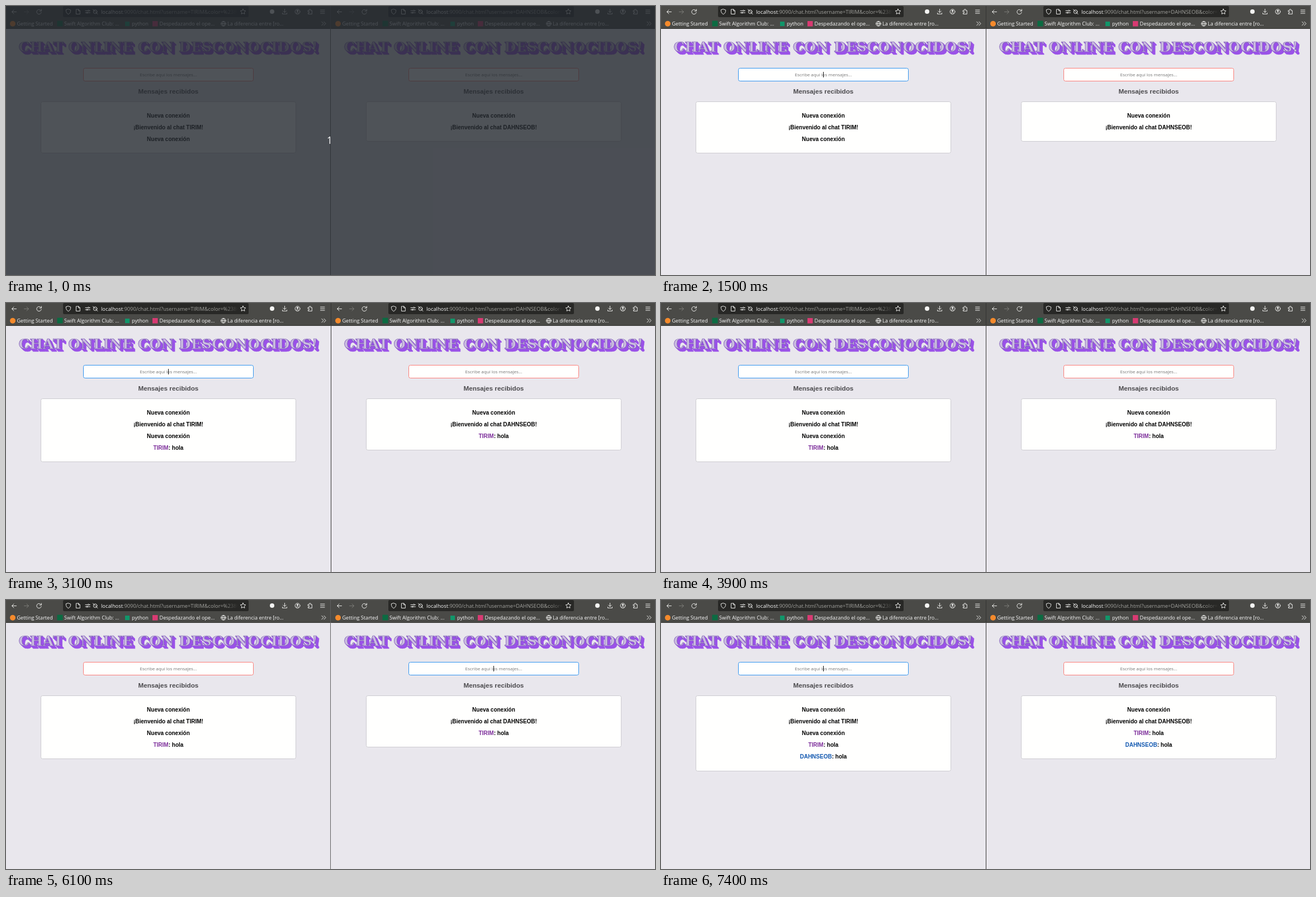
Write an HTML page that moves like this. It is 1161 px wide and 482 px high and loops after 8000 ms.

```html
<!DOCTYPE html>
<html lang="es">
<head>
<meta charset="utf-8">
<title>Chat</title>
<style>
  html, body { margin: 0; width: 100%; height: 100%; overflow: hidden; background: #e9e7ed; }
  svg { display: block; }
  text { white-space: pre; }
  .ui { font-family: "Open Sans", "Noto Sans", sans-serif; font-size: 9.1px; fill: #fafafa; }
  .url { font-size: 9.3px; }
  .field { font-size: 8px; text-anchor: middle; }
  .msg { font: bold 10px "Liberation Sans", Arial, sans-serif; text-anchor: middle; }
  .sub { font-size: 11.7px; fill: #4b4a4d; }
  .title { font: bold 25px "DejaVu Serif", serif; text-anchor: middle; stroke-width: .7px; }
  .icons { fill: none; stroke: #f4f4f2; stroke-width: .95; stroke-linecap: round; stroke-linejoin: round; }
</style>
</head>
<body>
<svg id="stage" width="1161" height="482" viewBox="0 0 1161 482"></svg>
<script>
const LOOP = 8000, MID = 290.4, RIGHT = 582;
const LEFT_NAME = "TIRIM", RIGHT_NAME = "DAHNSEOB";
const stage = document.getElementById("stage");
const pen = document.createElement("canvas").getContext("2d");

const between = (t, a, b) => t >= a && t < b;
// Last value whose start time has passed.
const at = (t, steps) => steps.reduce((v, [start, next]) => t >= start ? next : v, "");

const text = (x, y, cls, s, extra = "") => `<text x="${x}" y="${y}" class="${cls}" ${extra}>${s}</text>`;
const rect = (x, y, w, h, fill, extra = "") =>
  `<rect x="${x}" y="${y}" width="${w}" height="${h}" fill="${fill}" ${extra}/>`;
const circle = (x, y, r, extra = "") => `<circle cx="${x}" cy="${y}" r="${r}" ${extra}/>`;
const path = (d, extra = "") => `<path d="${d}" ${extra}/>`;

function star(cx, cy, r) {
  const points = Array.from({ length: 10 }, (_, i) => {
    const a = i * Math.PI / 5 - Math.PI / 2, q = i % 2 ? r * .5 : r;
    return `${(cx + q * Math.cos(a)).toFixed(2)},${(cy + q * Math.sin(a)).toFixed(2)}`;
  });
  return path(`M${points.join("L")}Z`);
}

const icons = `<g class="icons">
  ${path("M18.5 10.5H10.5M14 7L10.5 10.5L14 14")}
  ${path("M32.5 10.5H40.5M37 7L40.5 10.5L37 14", 'stroke="#7d7d79"')}
  ${path("M62.6 8.2A4.2 4.2 0 1 0 63.2 11.5M63.4 6V9H60.2")}
  ${path("M111.5 5.7L115.7 7.2Q116 12.6 111.5 14.8Q107 12.6 107.3 7.2Z")}
  ${path("M125.8 6H129.8L132.3 8.5V14.5H125.8ZM129.6 6V8.7H132.2")}
  ${path("M142 8.4H146M149 8.4H150.5M142 12H143.5M146.5 12H150.5")}
  ${circle(147.6, 8.4, 1.1)}${circle(145, 12, 1.1)}
  ${circle(159.6, 10.3, 3.3)}${path("M155.5 6L164 14.6")}
  ${star(424, 10.3, 5)}
  ${circle(476, 10, 4, 'fill="#f4f4f2" stroke="none"')}
  ${path("M498.5 5.5V11.5M495.7 9L498.5 11.8L501.3 9M494.5 12.5V14.3H502.5V12.5")}
  ${circle(521.5, 10.2, 4.4)}${circle(521.5, 8.8, 1.3, 'fill="#f4f4f2"')}${path("M519.2 12.6Q521.5 10.8 523.8 12.6")}
  ${path("M540.5 8H542.6Q541.8 5.7 543.8 5.7T545 8H547.3V14.4H540.5V12.3Q542.9 12.7 542.9 11.2T540.5 10.1Z")}
  ${path("M562.5 7.2H570M562.5 10.2H570M562.5 13.2H570")}
  ${path("M564.8 28.2L568 31.5L564.8 34.8M568.8 28.2L572 31.5L568.8 34.8")}
  ${circle(389, 31.7, 4.3)}${path("M384.8 31.7H393.2M389 27.4Q385 31.7 389 36Q393 31.7 389 27.4")}
</g>`;

const bookmarks = [
  [19.5, "Getting Started"], [104, "Swift Algorithm Club: …"], [225, "python"],
  [274.5, "Despedazando el ope…"], [396, "La diferencia entre [ro…"]
].map(([x, s]) => text(x, 34.9, "ui", s)).join("")
  + circle(12, 31.7, 5, 'fill="#f58a2c"')
  + rect(91.5, 26.5, 10, 10, "#0b6b42")
  + rect(213, 28, 8, 8, "#11966a")
  + rect(262, 27, 9.5, 9.5, "#d83a72");

const HEADING = "CHAT ONLINE CON DESCONOCIDOS!";
const titleLayer = (d, fill, stroke) =>
  text(MID + d, 81.6 + d, "title", HEADING, `fill="${fill}" stroke="${stroke}"`);
const title = [5, 4, 3, 2, 1].map(d => titleLayer(d, "#9b53e8", "#9b53e8")).join("")
  + titleLayer(0, "#cabcdf", "#7550b3");

function chrome(name, hover) {
  return rect(0, 0, 581, 41, "#4a4a47") + rect(0, 40, 581, 1, "#30302e")
    + rect(102, 0, 332, 20, "#282826", 'rx="2.5"')
    + (hover ? rect(88, 24, 119, 15, "#fff", `rx="2" fill-opacity="${hover}"`) : "")
    + `<g mask="url(#fade)">${text(170, 13.6, "ui url",
        `localhost<tspan fill="#a3a39f">:9090/chat.html?username=${name}&amp;color=%23863</tspan>`)}</g>`
    + bookmarks + icons;
}

function field({ draft, focus, caret }) {
  pen.font = '8px "Open Sans", "Noto Sans", sans-serif';
  const caretX = draft ? MID + pen.measureText(draft).width / 2 : 290;
  return rect(138.5, 111.5, 304, 23, "#fffffe", `rx="3" stroke="${focus ? "#2f93ee" : "#fb7c77"}"`)
    + text(MID, 126, "ui field", draft || "Escribe aquí los mensajes...",
        `style="fill:${draft ? "#111" : "#757575"}"`)
    + (caret ? rect(caretX, 118, 1, 10, "#111") : "");
}

function panel(x, view) {
  const lines = view.lines.map((s, i) => text(MID, 199.6 + i * 21.2, "msg", s)).join("");
  const height = 71 + (view.lines.length - 2) * 21.2;
  return `<g transform="translate(${x})">` + chrome(view.name, view.hover) + title + field(view)
    + text(MID, 156.7, "msg sub", "Mensajes recibidos")
    + rect(62.5, 171.5, 456, Math.round(height), "#fffffe", 'rx="3" stroke="#cccbd0"')
    + lines + "</g>";
}

const said = (name, color) => `<tspan fill="${color}">${name}</tspan>: hola`;
const welcome = name => `¡Bienvenido al chat ${name}!`;
const typing = (t, [h, o, l, a, sent]) =>
  at(t, [[h, "h"], [o, "ho"], [l, "hol"], [a, "hola"], [sent, ""]]);

const defs = `<defs>
  <linearGradient id="edge" gradientUnits="userSpaceOnUse" x1="390" x2="415">
    <stop stop-color="#fff"/><stop offset="1" stop-color="#000"/>
  </linearGradient>
  <mask id="fade" maskUnits="userSpaceOnUse" x="165" y="0" width="250" height="20">
    ${rect(165, 0, 250, 20, "url(#edge)")}
  </mask>
</defs>`;

function scene(t) {
  const chat = [];
  if (t >= 3100) chat.push(said(LEFT_NAME, "#7d2f9b"));
  if (t >= 6200) chat.push(said(RIGHT_NAME, "#1258b0"));
  const left = {
    name: LEFT_NAME,
    lines: ["Nueva conexión", welcome(LEFT_NAME), "Nueva conexión", ...chat],
    draft: typing(t, [2300, 2500, 2700, 2800, 3100]),
    focus: between(t, 1500, 4100) || t >= 7400,
    caret: between(t, 1500, 3600) || t >= 7400
  };
  const right = {
    name: RIGHT_NAME,
    lines: ["Nueva conexión", welcome(RIGHT_NAME), ...chat],
    draft: typing(t, [4900, 5100, 5300, 5500, 6100]),
    focus: between(t, 4200, 7300),
    caret: between(t, 4200, 6500),
    hover: at(t, [[3700, .08], [3800, .15], [3900, 0]])
  };
  // The border belongs to whichever window is in front.
  const [edgeX, edgeColor] = t < 500 || between(t, 4100, 7300) ? [580, "#606060"] : [581, "#343432"];
  const countdown = t < 100
    ? rect(0, 0, 1161, 482, "#24282f", 'fill-opacity=".8"')
      + text(579, 247, "ui", "1", 'style="font-size:17.5px;text-anchor:middle;fill:#fff"')
    : "";
  return defs + rect(0, 0, 1161, 482, "#e9e7ed") + panel(0, left) + panel(RIGHT, right)
    + rect(580, 0, 2, 41, "#4a4a47") + rect(edgeX, 0, 1, 482, edgeColor) + countdown;
}

let shown = "";
function frame() {
  const next = scene(performance.now() % LOOP);
  if (next !== shown) stage.innerHTML = shown = next;
  requestAnimationFrame(frame);
}
frame();
</script>
</body>
</html>
```
